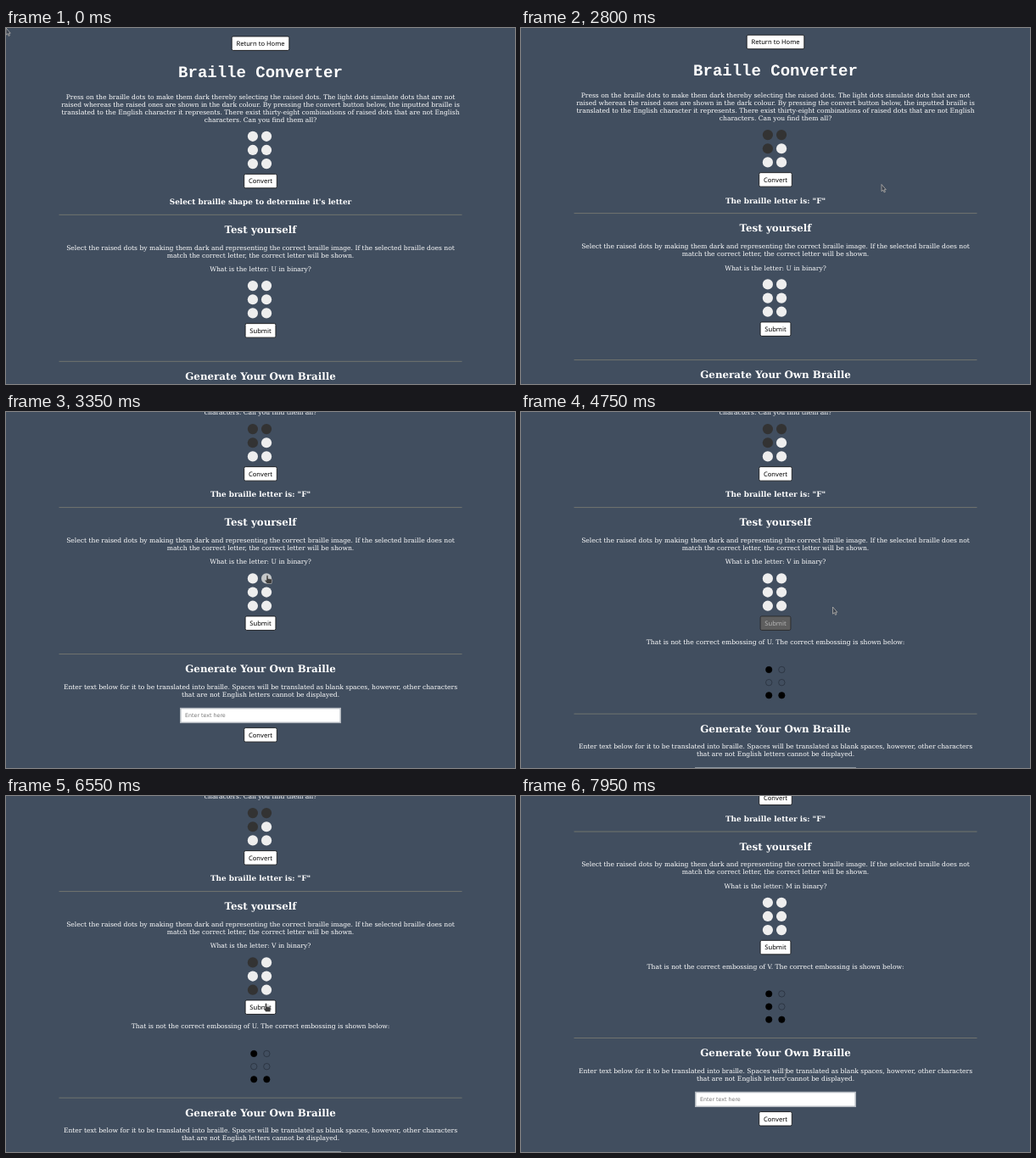
Recreate the animation shown at these times as an HTML page. Size 600 by 420 pixels, loop 8000 ms.

```html
<!DOCTYPE html>
<html lang="en">
<head>
<meta charset="utf-8">
<title>Braille Converter</title>
<style>
  html, body { margin: 0; width: 100%; height: 100%; overflow: hidden; background: #414e5f; }
  svg { display: block; width: 100%; height: 100%; }
  text { fill: #fff; text-anchor: middle; text-rendering: geometricPrecision; font: 7.6px "DejaVu Serif", serif; }
  .h1 { font: bold 19px "Liberation Mono", monospace; }
  .h2 { font: bold 11.875px "DejaVu Serif", serif; }
  .h3 { font: bold 8.89px "DejaVu Serif", serif; }
  .hint { font: 6.33px "DejaVu Sans", sans-serif; fill: #757575; text-anchor: start; }
  .rule { fill: #757870; }
  .button rect { fill: #fff; stroke: #1d1f22; stroke-width: .95; }
  .button text { font: 7.6px "Noto Sans", sans-serif; fill: #000; }
  .button.disabled rect { fill: #5e5e5e; stroke: #2b2c2e; }
  .button.disabled text { fill: #b4b4b4; }
  .dot { fill: #eee; }
  .dot.hover { fill: #c3c6c8; }
  .dot.on { fill: #333; }
  .cell { fill: none; stroke: #202833; stroke-width: .6; }
  .cell.on { fill: #000; stroke: #000; }
</style>
</head>
<body>
<svg id="stage" viewBox="0 0 600 420" preserveAspectRatio="none"></svg>
<script>
const LOOP = 8000, STEP = 50, MIDDLE = 300, LINE = 9.025;
const stage = document.getElementById("stage");

function add(parent, tag, attrs = {}, content = "") {
  const node = document.createElementNS("http://www.w3.org/2000/svg", tag);
  for (const key in attrs) node.setAttribute(key, attrs[key]);
  node.textContent = content;
  return parent.appendChild(node);
}

const label = (parent, y, content, cls = "p") => add(parent, "text", { x: MIDDLE, y, class: cls }, content);
const paragraph = (parent, y, lines) => lines.forEach((line, i) => label(parent, y + i * LINE, line));

// A rule, a heading and an introduction.
function section(parent, top, title, lines) {
  add(parent, "rect", { class: "rule", x: 62.5, y: top - .45, width: 475, height: .9 });
  label(parent, top + 21.6, title, "h2");
  paragraph(parent, top + 41.3, lines);
}

// The box grows with its text.
function button(parent, centerY, content) {
  const node = add(parent, "g", { class: "button" });
  const box = add(node, "rect", { height: 16.5, rx: 1.7 });
  const width = label(node, centerY + 2.8, content).getComputedTextLength() + 10.5;
  box.setAttribute("x", MIDDLE - width / 2);
  box.setAttribute("y", centerY - 8.25);
  box.setAttribute("width", width);
  return { node, centerY, width };
}

// Six dots, row by row.
function grid(parent, cls, x, y, gap, r) {
  return Array.from({ length: 6 }, (_, i) => {
    const cx = x + (i % 2) * gap, cy = y + Math.floor(i / 2) * gap;
    return { cx, cy, node: add(parent, "circle", { class: cls, cx, cy, r }) };
  });
}
const dotGrid = (parent, y) => grid(parent, "dot", 290.9, y, 16.15, 6.1);

const page = add(stage, "g");
button(page, 18.2, "Return to Home");
label(page, 57.7, "Braille Converter", "h1");
paragraph(page, 83.6, [
  "Press on the braille dots to make them dark thereby selecting the raised dots. The light dots simulate dots that are not",
  "raised whereas the raised ones are shown in the dark colour. By pressing the convert button below, the inputted braille is",
  "translated to the English character it represents. There exist thirty-eight combinations of raised dots that are not English",
  "characters. Can you find them all?"
]);
const converterDots = dotGrid(page, 127.8);
const convert = button(page, 180.6, "Convert");
const letter = label(page, 208.2, "", "h3");

section(page, 220.3, "Test yourself", [
  "Select the raised dots by making them dark and representing the correct braille image. If the selected braille does not",
  "match the correct letter, the correct letter will be shown."
]);
const question = label(page, 287.2, "");
const quizDots = dotGrid(page, 304.1);
const submit = button(page, 356.9, "Submit");
const result = add(page, "g");
const verdict = label(result, 382, "");
const answer = grid(result, "cell", 292.2, 411.7, 15.15, 3.7);

const generator = add(page, "g");
section(generator, 393.3, "Generate Your Own Braille", [
  "Enter text below for it to be translated into braille. Spaces will be translated as blank spaces, however, other characters",
  "that are not English letters cannot be displayed."
]);
add(generator, "rect", { x: 205.8, y: 457.3, width: 188.4, height: 16.8, fill: "#fff", stroke: "#b5bac1", "stroke-width": 1.5 });
add(generator, "text", { x: 211, y: 468.2, class: "hint" }, "Enter text here");
button(generator, 488.6, "Convert");

const cursor = add(stage, "g");
const shapes = {
  arrow: add(cursor, "path", { d: "M0 0V8.2L1.9 6.6 3.1 9.4 4.4 8.8 3.2 6.2H5.3Z", fill: "#3c4450", stroke: "#d9d2c8", "stroke-width": .6 }),
  hand: add(cursor, "path", { d: "M-1 .8Q0-.6 1 .8V4L4.6 4.6Q6 5 5.7 6.5L5 10H-.3L-3 6.4Q-3 5-1 6Z", fill: "#3d3d3d", stroke: "#cfcfcf", "stroke-width": .5 }),
  beam: add(cursor, "path", { d: "M-1.5-4.5H1.5M0-4.5V4.5M-1.5 4.5H1.5", fill: "none", stroke: "#c9c9c9", "stroke-width": .7 })
};

// Where the pointer comes to rest, and when.
const stops = [
  { at: 0, x: 320.5, y: 114.5 },
  { at: 250, x: 286, y: 123 },
  { at: 600, x: 294, y: 126.5 },
  { at: 850, x: 306.5, y: 127 },
  { at: 1250, x: 290.5, y: 143 },
  { at: 1850, x: 302, y: 180 },
  { at: 2250, x: 425, y: 184.5 },
  { at: 3350, x: 308, y: 192.5 },
  { at: 3600, x: 290, y: 198.5 },
  { at: 4200, x: 301, y: 246 },
  { at: 4700, x: 367.5, y: 230 },
  { at: 5550, x: 288, y: 194 },
  { at: 6250, x: 288, y: 224.5 },
  { at: 6550, x: 306.5, y: 244.5 },
  { at: 7200, x: 311.5, y: 312 },
  { at: 7900, x: 312, y: 327.5 }
];
const CONVERT = 1900, SUBMITS = [4300, 6700], COOLDOWN = 500;
const QUIZ_LETTERS = "UVM", EMBOSSING = { U: "100011", V: "101011" };

const within = (t, start, end) => t >= start && t < end;

function ease(t, start, end) {
  const u = Math.min(1, Math.max(0, (t - start) / (end - start)));
  return u * u * (3 - 2 * u);
}

// The pointer waits for half of each interval, then travels.
function pointerAt(t) {
  const next = stops.find(stop => stop.at >= t) || stops.at(-1);
  const last = stops[Math.max(0, stops.indexOf(next) - 1)];
  const u = ease(t, (last.at + next.at) / 2, next.at);
  return { x: last.x + (next.x - last.x) * u, y: last.y + (next.y - last.y) * u };
}

const scrollAt = t => 107.7 * ease(t, 2760, 3300) + 70.6 * ease(t, 7200, 7750);

function paintDots(dots, selected, x, y) {
  let touched = false;
  dots.forEach((dot, i) => {
    const over = Math.hypot(x - dot.cx, y - dot.cy) < 7;
    touched ||= over;
    dot.node.setAttribute("class", "dot" + (selected[i] ? " on" : over ? " hover" : ""));
  });
  return touched;
}

function render(t) {
  const { x, y } = pointerAt(t);
  const scroll = scrollAt(t), pageY = y + scroll;
  const round = SUBMITS.filter(time => t >= time).length;
  const tested = QUIZ_LETTERS[Math.max(0, round - 1)];

  page.setAttribute("transform", `translate(0 ${-scroll})`);
  generator.setAttribute("transform", `translate(0 ${round ? 70.5 : 0})`);
  result.setAttribute("visibility", round ? "visible" : "hidden");

  letter.textContent = t < CONVERT ? "Select braille shape to determine it's letter" : 'The braille letter is: "F"';
  question.textContent = `What is the letter: ${QUIZ_LETTERS[round]} in binary?`;
  verdict.textContent = `That is not the correct embossing of ${tested}. The correct embossing is shown below:`;
  answer.forEach((cell, i) => cell.node.setAttribute("class", EMBOSSING[tested][i] === "1" ? "cell on" : "cell"));

  const onConverter = paintDots(converterDots, [t >= 450, t >= 1050, t >= 1450], x, pageY);
  const topPicked = within(t, 3550, SUBMITS[0]) || within(t, 5650, SUBMITS[1]);
  const bottomPicked = within(t, 6200, SUBMITS[1]);
  const onQuiz = paintDots(quizDots, [topPicked, 0, 0, 0, bottomPicked], x, pageY);

  const cooling = time => within(t, time, time + COOLDOWN);
  convert.node.classList.toggle("disabled", cooling(CONVERT));
  submit.node.classList.toggle("disabled", SUBMITS.some(cooling));
  const onButton = [convert, submit].some(b => Math.abs(x - MIDDLE) < b.width / 2 && Math.abs(pageY - b.centerY) < 8.4);

  const shape = t >= 7800 ? "beam" : onConverter || onQuiz || onButton ? "hand" : "arrow";
  for (const name in shapes) shapes[name].setAttribute("visibility", name === shape ? "visible" : "hidden");
  cursor.setAttribute("transform", `translate(${x} ${y})`);
}

function tick() {
  render(Math.floor(performance.now() % LOOP / STEP) * STEP);
  requestAnimationFrame(tick);
}
tick();
</script>
</body>
</html>
```
